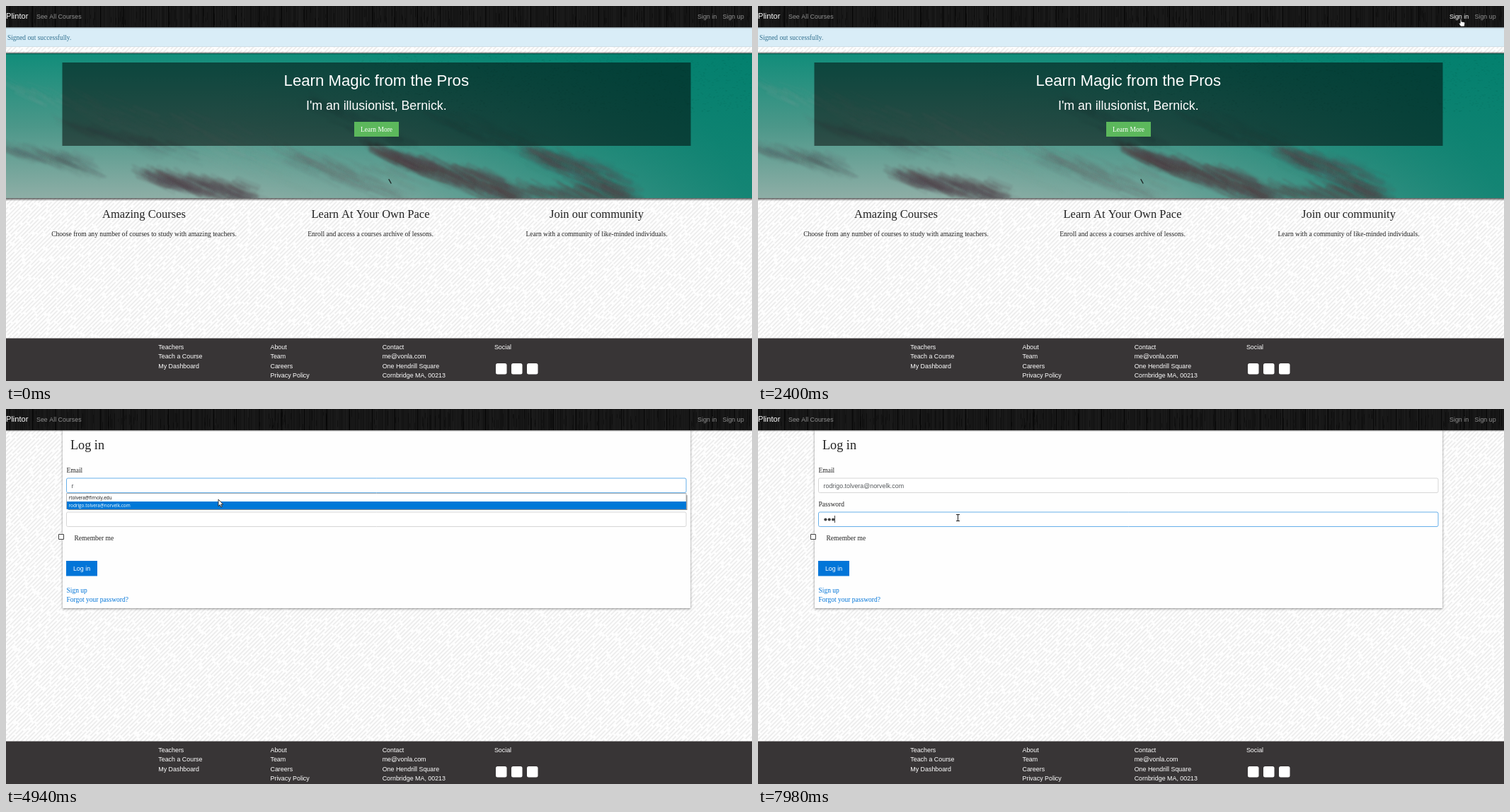
An HTML page with a canvas for the animation above (8000 ms loop, 1054 px wide and 531 px high).

```html
<!DOCTYPE html>
<html lang="en">
<head>
<meta charset="utf-8">
<title>Course site sign-in</title>
<style>
  html, body { margin: 0; width: 100%; height: 100%; overflow: hidden; }
  canvas { display: block; }
</style>
</head>
<body>
<canvas id="stage" width="1054" height="531"></canvas>
<script>
const W = 1054, H = 531, LOOP = 8000;
const SANS = '"Liberation Sans", Arial, sans-serif';
const SERIF = '"Liberation Serif", "Times New Roman", serif';
const LIST = '"Open Sans", sans-serif';
const stage = document.getElementById('stage').getContext('2d');

let seed = 7;
const rand = (a = 0, b = 1) => {
  seed = (seed * 16807) % 2147483647;
  return a + (b - a) * seed / 2147483647;
};

function rect(c, x, y, w, h, color) {
  c.fillStyle = color;
  c.fillRect(x, y, w, h);
}

function text(c, str, x, y, size, color, family = SANS, align = 'left') {
  c.font = `${size}px ${family}`;
  c.fillStyle = color;
  c.textAlign = align;
  c.fillText(str, x, y);
}

function box(c, x, y, w, h, stroke, fill, radius = 2) {
  c.beginPath();
  c.roundRect(x, y, w, h, radius);
  c.fillStyle = fill;
  c.fill();
  c.strokeStyle = stroke;
  c.lineWidth = 1;
  c.stroke();
}

function gradient(c, x0, y0, x1, y1, ...colors) {
  const g = c.createLinearGradient(x0, y0, x1, y1);
  colors.forEach((color, i) => g.addColorStop(i / (colors.length - 1), color));
  return g;
}

function layer(paint) {
  const canvas = document.createElement('canvas');
  canvas.width = W;
  canvas.height = H;
  paint(canvas.getContext('2d'));
  return canvas;
}

// ---- Parts shared by both pages ----
function paintPaper(c) {
  rect(c, 0, 0, W, H, '#fdfdfd');
  c.strokeStyle = '#ebebeb';
  c.lineWidth = 1.5;
  for (let x = 0; x < W + H; x += 6) {
    c.setLineDash([rand(14, 40), rand(1, 4), rand(6, 24), rand(2, 6)]);
    c.beginPath();
    c.moveTo(x, 0);
    c.lineTo(x - H, H);
    c.stroke();
  }
  c.setLineDash([]);
}

function paintNav(c) {
  for (let x = 0; x < W; x++) {
    const v = Math.round(rand(18, 28));
    rect(c, x, 0, 1, 30, `rgb(${v},${v},${v})`);
    if (x % 32 === 5) rect(c, x, 0, 1, 30, '#060606');
  }
  for (let i = 0; i < 200; i++) {
    const y = rand(0, 24);
    rect(c, Math.floor(rand(0, W)), y, 1, rand(4, 30 - y), 'rgba(0,0,0,.35)');
  }
  rect(c, 0, 30, W, 2, gradient(c, 0, 30, 0, 32, 'rgba(0,0,0,.5)', 'rgba(0,0,0,0)'));
  text(c, 'Plintor', 0, 18, 11.1, '#fff');
  text(c, 'See All Courses', 43, 18, 8.88, '#8f8f8f');
  text(c, 'Sign in', 977, 18, 8.88, '#8f8f8f');
  text(c, 'Sign up', 1012.5, 18, 8.88, '#8f8f8f');
}

function paintFooter(c) {
  rect(c, 0, 470.5, W, 61, '#383536');
  const columns = [
    ['Teachers', 'Teach a Course', 'My Dashboard'],
    ['About', 'Team', 'Careers', 'Privacy Policy'],
    ['Contact', 'me@vonla.com', 'One Hendrill Square', 'Cornbridge MA, 00213'],
    ['Social'],
  ];
  columns.forEach((lines, i) => lines.forEach((line, j) =>
    text(c, line, 215.3 + i * 158.2, 486 + j * 13.35, 8.88, '#fff')));
  for (const x of [692, 714, 736]) {
    c.beginPath();
    c.roundRect(x, 506, 15.5, 15.5, 2.5);
    c.fillStyle = '#fff';
    c.fill();
  }
}

// ---- Home page ----
// A cloud of short feathered strokes scattered around the line from (x0,y0) to (x1,y1).
function cloud(c, [x0, y0, x1, y1], spread, color, count, alpha = 0.12) {
  c.strokeStyle = color;
  c.lineCap = 'round';
  for (let i = 0; i < count; i++) {
    const u = rand(), len = rand(15, 60), slope = rand(0.3, 0.6);
    const x = x0 + (x1 - x0) * u - len / 2;
    const y = y0 + (y1 - y0) * u + (rand(-1, 1) + rand(-1, 1)) * spread * (0.25 + u * 0.5) - len * slope / 2;
    c.globalAlpha = rand(0.3, 1) * alpha;
    c.lineWidth = rand(1, 7);
    c.beginPath();
    c.moveTo(x, y);
    c.quadraticCurveTo(x + len * 0.5, y + len * slope * 0.6, x + len, y + len * slope);
    c.stroke();
  }
  c.globalAlpha = 1;
}

function paintHero(c) {
  c.save();
  c.beginPath();
  c.rect(0, 67, W, 205);
  c.clip();
  rect(c, 0, 67, W, 205, gradient(c, 0, 67, 0, 272, '#118d7a', '#4b9789', '#8eaea6'));
  rect(c, 0, 67, W, 205, gradient(c, 300, 0, W, 0, 'rgba(0,126,108,0)', 'rgba(0,126,108,.5)'));
  rect(c, 0, 67, W, 205, gradient(c, 560, 272, 940, 67, 'rgba(0,126,108,0)', 'rgba(0,126,108,.7)'));
  c.filter = 'blur(1.2px)';
  cloud(c, [0, 110, 420, 225], 32, '#7f9f98', 130, 0.14);
  cloud(c, [90, 170, 260, 208], 11, '#5f7275', 70);
  cloud(c, [0, 202, 120, 226], 11, '#5e6b6e', 110);
  cloud(c, [200, 242, 350, 268], 15, '#5b5056', 240, 0.16);
  cloud(c, [400, 215, 570, 262], 26, '#6b7877', 150, 0.11);
  cloud(c, [430, 135, 570, 200], 20, '#3f6f69', 70);
  cloud(c, [530, 208, 720, 268], 18, '#564a4e', 330, 0.2);
  cloud(c, [600, 150, 780, 215], 26, '#42746d', 80);
  cloud(c, [740, 205, 875, 262], 26, '#575456', 260, 0.14);
  cloud(c, [700, 262, 880, 268], 10, '#574c4f', 130, 0.18);
  c.filter = 'none';
  for (let i = 0; i < 1200; i++) {
    rect(c, rand(500, W), rand(67, 150), 2, 1, 'rgba(0,80,70,.15)');
  }
  rect(c, 79.5, 80, 888, 118, 'rgba(0,0,0,.5)');
  rect(c, 0, 67, W, 2, gradient(c, 0, 67, 0, 69, 'rgba(0,0,0,.4)', 'rgba(0,0,0,0)'));
  c.strokeStyle = '#1d2423';
  c.lineWidth = 1.4;
  c.beginPath();
  c.moveTo(541, 245.5);
  c.lineTo(544, 251);
  c.stroke();
  c.restore();
  rect(c, 0, 65, W, 2, gradient(c, 0, 65, 0, 67, 'rgba(0,0,0,.1)', 'rgba(0,0,0,.5)'));
  rect(c, 0, 272, W, 4, gradient(c, 0, 272, 0, 276, 'rgba(0,0,0,.65)', 'rgba(0,0,0,0)'));
  text(c, 'Learn Magic from the Pros', 523.3, 113, 22.2, '#fff', SANS, 'center');
  text(c, "I'm an illusionist, Bernick.", 523.3, 147, 17.76, '#fff', SANS, 'center');
  rect(c, 492, 164, 63, 21, '#5cb85c');
  text(c, 'Learn More', 523.5, 178, 9.5, '#fff', SERIF, 'center');
}

const home = layer(c => {
  paintPaper(c);
  rect(c, 0, 30, W, 27.5, '#d9edf7');
  rect(c, 0, 57, W, 1, '#cfdfe8');
  text(c, 'Signed out successfully.', 2, 47.5, 9.4, '#31708f', SERIF);
  paintNav(c);
  paintHero(c);
  const features = [
    [195, 'Amazing Courses', 'Choose from any number of courses to study with amazing teachers.'],
    [515, 'Learn At Your Own Pace', 'Enroll and access a courses archive of lessons.'],
    [834.5, 'Join our community', 'Learn with a community of like-minded individuals.'],
  ];
  for (const [x, title, line] of features) {
    text(c, title, x, 299.5, 16.5, '#222', SERIF, 'center');
    text(c, line, x, 325.5, 9.56, '#222', SERIF, 'center');
  }
  paintFooter(c);
});

// ---- Login page ----
const login = layer(c => {
  paintPaper(c);
  c.save();
  c.shadowColor = 'rgba(0,0,0,.45)';
  c.shadowBlur = 3;
  c.shadowOffsetY = 1;
  rect(c, 80, 28, 887, 254, '#fefefe');
  c.restore();
  paintNav(c);
  text(c, 'Log in', 91, 57, 18.2, '#222', SERIF);
  text(c, 'Email', 85.5, 90, 9.5, '#222', SERIF);
  text(c, 'Password', 85.5, 138, 9.5, '#222', SERIF);
  box(c, 74.5, 177.5, 7, 7, '#444', '#fff', 0);
  text(c, 'Remember me', 96.5, 185.5, 9.5, '#222', SERIF);
  rect(c, 85, 215, 44, 21.5, '#0275d8');
  text(c, 'Log in', 107, 229.3, 8.88, '#fff', SANS, 'center');
  text(c, 'Sign up', 85.5, 260, 9.5, '#0275d8', SERIF);
  text(c, 'Forgot your password?', 85.5, 273, 9.5, '#0275d8', SERIF);
  paintFooter(c);
});

// ---- Moving parts ----
const EMAILS = ['rtolvera@firnoly.edu', 'rodrigo.tolvera@norvelk.com'];
const PAGE = 2630, TYPE = 4150, OPEN = 4230, PICK = 5190, FILL = 5340, FOCUS = 6030;
const DOTS = [7210, 7750, 7980];

// Pointer stops: time, x, y
const PATH = [
  [520, 1030, 455], [750, 1023, 261], [920, 1023, 261], [1150, 1002, 171], [1230, 1000, 150],
  [1700, 993, 21], [1760, 993, 18], [2629, 993, 18], [2630, 949, 11], [2720, 930, 14],
  [3270, 334, 110], [4560, 334, 110], [4790, 300, 128], [4940, 300, 128],
  [5020, 295, 132], [5270, 295, 132], [5960, 282, 154], [LOOP, 282, 154],
];

function pointerAt(t) {
  const i = PATH.findIndex(p => p[0] > t);
  const [t0, x0, y0] = PATH[i - 1], [t1, x1, y1] = PATH[i];
  const k = (t - t0) / (t1 - t0);
  return [x0 + (x1 - x0) * k, y0 + (y1 - y0) * k];
}

const ARROW = new Path2D('M0 0V9.6L2.2 7.6L3.8 11L5.4 10.3L3.8 7H6.8Z');
const HAND = new Path2D('M-.9 .8Q0-.4.9.8V4L5 4.9Q5.9 5.2 5.8 6.2L5 11H-.2L-2.8 6.8Q-2.8 5.4-.9 6.4Z');

function drawPointer(c, kind, x, y) {
  c.save();
  c.translate(Math.round(x), Math.round(y));
  c.strokeStyle = '#222';
  c.fillStyle = '#fff';
  c.lineWidth = 0.9;
  if (kind === 'beam') {
    c.lineWidth = 1;
    c.stroke(new Path2D('M-2 -4.5H3M.5 -4.5V4.5M-2 4.5H3'));
  } else {
    const shape = kind === 'hand' ? HAND : ARROW;
    c.fill(shape);
    c.stroke(shape);
  }
  c.restore();
}

function caretShown(t) {
  if (t < TYPE) return (t - PAGE) % 1100 < 550;
  if (t < PICK) return (t - TYPE) % 1100 < 550;
  if (t < FOCUS) return (t - PICK) % 1100 < 550;
  if (t < DOTS[0]) return t < 6420 || t >= 6990;
  return t < 7520 || t >= DOTS[1];
}

function drawSuggestions(c, t) {
  const active = t < 4700 ? -1 : t < 4940 ? 0 : 1;
  rect(c, 88, 122, 874.5, 21, '#8c8c8c');
  box(c, 85.5, 119.5, 875.5, 22, '#b5b5b5', '#fff', 0);
  EMAILS.forEach((mail, i) => {
    if (i === active) rect(c, 86, 120 + i * 11, 875, 11, '#0078d7');
    text(c, mail, 88.5, 128 + i * 11, 6.45, i === active ? '#fff' : '#111', LIST);
  });
}

function drawForm(c, t) {
  const onPassword = t >= FOCUS;
  const border = on => on ? '#66afe9' : '#d6d6d6';
  box(c, 85.5, 98, 875.5, 20.5, border(t >= PAGE + 90 && !onPassword), '#fff');
  box(c, 85.5, 146, 875.5, 20.5, border(onPassword), '#fff');

  const email = t < TYPE ? '' : t < FILL ? 'r' : EMAILS[1];
  text(c, email, 92.5, 111.5, 8.88, '#55595c');
  const emailEnd = 92.5 + c.measureText(email).width;

  const typed = DOTS.filter(at => t >= at).length;
  for (let i = 0; i < typed; i++) {
    c.beginPath();
    c.arc(95.4 + i * 5.35, 156.5, 2.1, 0, Math.PI * 2);
    c.fillStyle = '#444';
    c.fill();
  }
  if (caretShown(t)) {
    if (onPassword) rect(c, Math.floor(92.5 + typed * 5.45), 151, 1, 10, '#444');
    else rect(c, Math.floor(emailEnd), 104, 1, 9, '#444');
  }
  if (t >= OPEN && t < PICK) drawSuggestions(c, t);
}

function draw(t) {
  const c = stage, onHome = t < PAGE;
  c.drawImage(onHome ? home : login, 0, 0);
  if (!onHome) drawForm(c, t);
  if (t < PATH[0][0]) return;
  const [x, y] = pointerAt(t);
  const onLink = onHome && y < 22;
  if (onLink) text(c, 'Sign in', 977, 18, 8.88, '#c8c8c8');
  const inField = !onHome && (y > 98 && y < 119 || y > 146 && y < 167) && x > 85 && x < 961;
  drawPointer(c, onLink ? 'hand' : inField ? 'beam' : 'arrow', x, y);
}

function tick() {
  draw(performance.now() % LOOP);
  requestAnimationFrame(tick);
}
tick();
</script>
</body>
</html>
```
